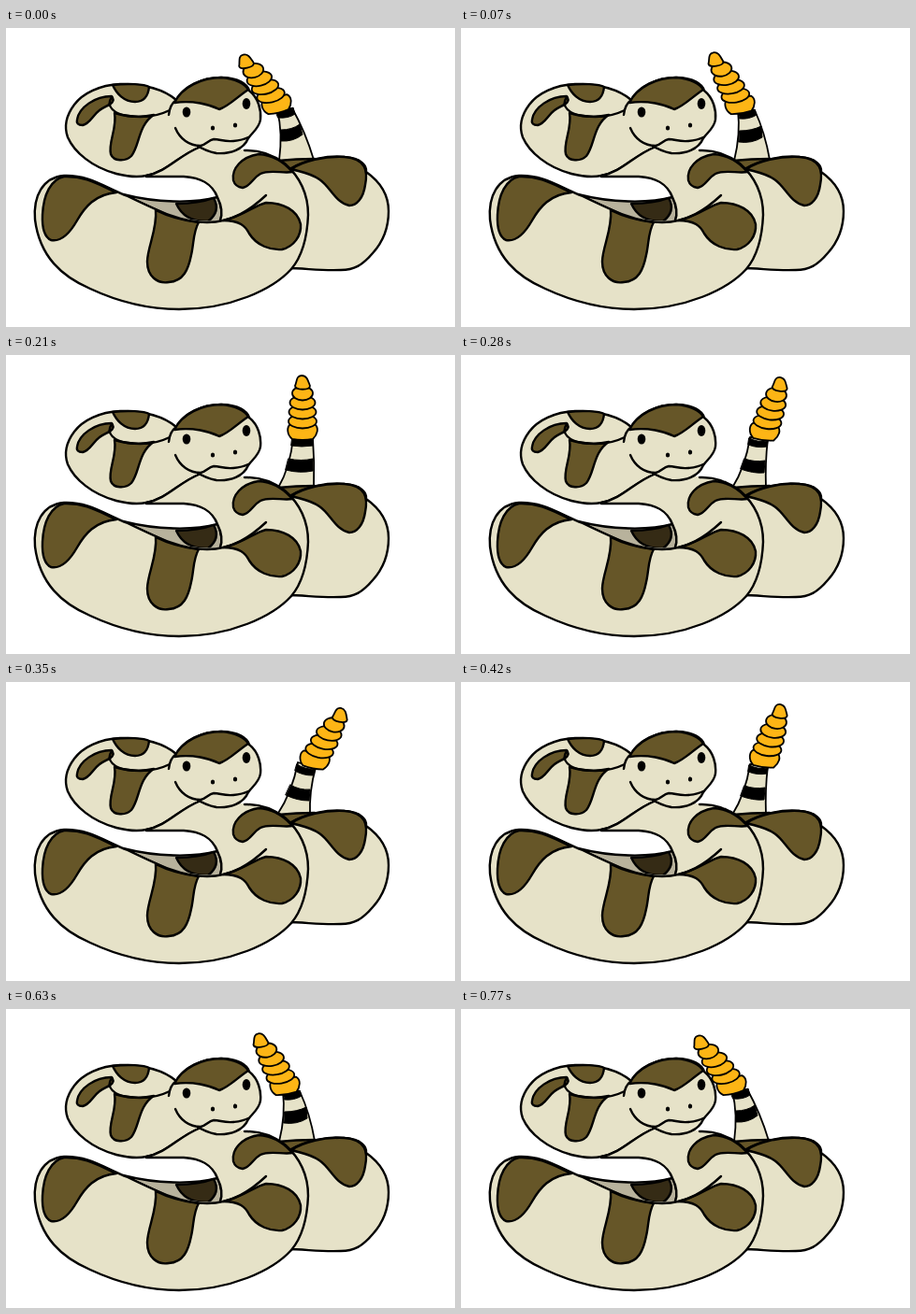
An HTML page without scripts for the animation above (0.84 s loop, 480 by 320 pixels).

```html
<!DOCTYPE html>
<html lang="en">
<head>
<meta charset="utf-8">
<title>Rattlesnake</title>
<style>
  html, body { margin: 0; width: 100%; height: 100%; overflow: hidden; background: #fff; }
  svg { display: block; width: 480px; height: 320px; }
  path, ellipse { stroke: #000; stroke-width: 2.4; stroke-linejoin: round; stroke-linecap: round; }
  .skin { fill: #e6e2c8; }
  .spot { fill: #665628; }
  .line { fill: none; }
  .bare, .dot ellipse { stroke: none; }

  /* The tail swings through six held poses, there and back. */
  .tail { animation: shake .84s step-end infinite; }
  .stalk { d: var(--stalk); stroke-width: 1.8; }
  .bands { d: var(--bands); stroke-width: 1; }
  .rattle { transform: var(--rattle); }
  /* Each ring slides sideways in proportion to its height. */
  .rattle * {
    fill: #fdb515; stroke-width: 1.8;
    transform: translateX(calc(var(--n) * var(--lean)));
  }

  @keyframes shake {
    0%, 91.66%, 100% {
      --stalk: path("M290 88Q296 112 292 142L303 151L329 141Q320 111 306 86Z");
      --bands: path("M289 91Q299 90 307 85L309 92Q302 97 291 96ZM294 109Q306 109 314 103L317 114Q307 122 294 121Z");
      --rattle: translate(294px, 88px) rotate(-13deg);
      --lean: -4.4px;
    }
    8.33%, 75%, 83.33% {
      --stalk: path("M296 88Q299 114 292 142L303 151L330 141Q325 112 314 88Z");
      --bands: path("M296 90Q306 91 314 87L316 93Q308 98 298 97ZM298 110Q311 110 321 105L322 117Q311 124 297 122Z");
      --rattle: translate(302px, 89px) rotate(-9deg);
      --lean: -3.7px;
    }
    16.66%, 66.66% {
      --stalk: path("M304 88Q301 120 291 142L303 151L331 141Q333 115 325 88Z");
      --bands: path("M303 90Q315 92 325 88L327 95Q315 99 303 97ZM301 111Q317 112 330 108L331 121Q316 126 299 123Z");
      --rattle: translate(313px, 90px) rotate(-7deg);
      --lean: -2.2px;
    }
    25%, 58.33% {
      --stalk: path("M307 88Q304 120 291 142L303 151L329 142Q330 115 328 89Z");
      --bands: path("M306 89Q317 93 328 90L328 97Q316 99 305 97ZM302 111Q316 114 328 111L328 124Q314 127 299 123Z");
      --rattle: translate(317px, 89px) rotate(0deg);
      --lean: 0px;
    }
    33.33%, 50% {
      --stalk: path("M309 88Q304 120 290 142L303 151L326 143Q325 115 328 90Z");
      --bands: path("M308 89Q318 94 328 92L327 98Q317 100 307 96ZM303 111Q314 115 325 113L324 126Q312 127 299 122Z");
      --rattle: translate(322px, 89px) rotate(7deg);
      --lean: 2.1px;
    }
    41.66% {
      --stalk: path("M312 86Q306 118 290 142L303 151L325 143Q324 116 331 92Z");
      --bands: path("M311 88Q320 94 330 93L328 100Q317 100 309 95ZM304 110Q314 116 325 115L324 127Q311 127 299 121Z");
      --rattle: translate(326px, 90px) rotate(11deg);
      --lean: 3.6px;
    }
  }
</style>
</head>
<body>
<svg viewBox="0 0 480 320">
  <g class="tail">
    <path class="stalk skin"/>
    <path class="bands"/>
    <g class="rattle">
      <path style="--n:.7" d="M-11 1C-17 -4 -17 -12 -13 -15H13C18 -11 16 -4 11 1Q0 3 -11 1Z"/>
      <ellipse style="--n:1.6" cy="-18" rx="15" ry="7.5"/>
      <ellipse style="--n:2.5" cy="-28" rx="14.5" ry="7.5"/>
      <ellipse style="--n:3.4" cy="-38" rx="13.5" ry="7.5"/>
      <ellipse style="--n:4.4" cy="-48" rx="11" ry="7.5"/>
      <path style="--n:5.7" d="M-8 -56C-6 -60 -7 -67 -1 -67C5 -67 6 -61 8 -56C8 -51 -8 -51 -8 -56Z"/>
    </g>
  </g>
  <path class="spot" d="M291 142L303 152L330 140Q310 140 291 142Z"/>

  <g id="rear-coil">
    <path class="skin" d="M303 151C320 141 345 136 362 138C380 139 386 148 385 154C402 166 409 181 409 196C409 215 402 230 392 241C381 254 372 259 358 259C335 260 320 257 300 257Z"/>
    <path class="spot" d="M305 151C318 142 340 137 362 138C385 140 387 153 384 168C382 182 375 190 367 190C352 187 347 170 335 162C325 155 315 154 305 151Z"/>
  </g>

  <g id="upper-coil">
    <path class="skin" d="M182 77C168 65 147 60 122 60C100 61 82 70 73 82C64 94 62 106 66 117C73 133 92 149 118 156C130 159 141 160 150 158C172 154 184 137 206 128Z"/>
    <path class="spot" d="M114 61C130 59 148 60 153 63C152 73 147 79 138 79C126 79 118 70 114 61Z"/>
    <path class="spot" d="M76 98C78 85 95 73 113 73C119 81 106 83 100 88C92 94 90 102 82 104C77 104 75 102 76 98Z"/>
    <path class="spot" d="M116 91C130 95 145 96 158 93C141 104 143 126 134 137C128 143 115 143 112 135C109 122 119 108 116 91Z"/>
    <path class="line" d="M113 74C106 84 116 92 130 94C150 97 165 93 175 88"/>
  </g>

  <g id="inner-coil">
    <path fill="#b8b29c" d="M125 178C160 187 200 188 226 181Q233 195 229 208H190Z"/>
    <path fill="#352b15" d="M182 188Q206 188 222 182Q230 196 216 207Q191 208 182 188Z"/>
  </g>

  <g id="front-coil">
    <path class="skin bare" d="M62 158C88 157 105 170 130 180C165 197 190 209 229 206Q233 195 226 181C220 166 208 160 190 159H150C172 154 184 137 206 128L247 130Q275 129 298 145C315 160 323 180 323 200C322 225 316 245 305 258C285 280 240 301 185 301C150 301 120 293 90 279C60 266 36 245 31 205C29 180 39 160 62 158Z"/>
    <path class="spot" d="M39 200C40 178 48 162 62 159C85 158 100 168 118 176C95 178 84 192 76 206C68 220 58 229 48 227Q38 222 39 200Z"/>
    <path class="spot" d="M160 195Q180 205 206 208C200 218 201 230 198 243C195 258 190 271 174 272C162 274 151 266 151 250C151 235 162 215 160 195Z"/>
    <path class="spot" d="M232 206C250 206 256 212 260 220C268 233 283 238 295 237C308 234 316 222 315 210C312 195 296 187 278 187C265 190 255 201 232 206Z"/>
    <path class="spot" d="M243 163C241 150 252 138 270 135C285 136 297 143 306 154C296 156 282 151 272 156C263 161 262 169 253 171Q245 170 243 163Z"/>
    <path class="line" d="M305 258C285 280 240 301 185 301C150 301 120 293 90 279C60 266 36 245 31 205C29 180 39 160 62 158C88 157 105 170 130 180C165 197 188 208 215 208C242 208 262 194 278 179"/>
    <path class="line" d="M150 159H190C208 160 220 166 226 181Q233 195 229 206M150 158C172 154 184 137 206 128"/>
    <path class="line" d="M255 131Q278 130 298 145C315 160 323 180 323 200C322 225 316 245 305 258"/>
  </g>

  <g id="head">
    <path class="skin bare" d="M174 93Q175 82 182 77L230 53L260 67L272 98L259 118C254 130 240 135 225 134L203 125C190 120 183 115 181 106Z"/>
    <path class="skin" d="M174 93Q175 82 182 77C190 62 210 53 230 53C248 53 258 60 260 67C270 75 273 88 272 98C271 107 263 112 259 118C254 130 240 135 225 134C215 132 209 129 203 125" stroke-dasharray="none"/>
    <path class="skin bare" d="M172 95L180 92L206 124L203 128Q180 122 172 95Z"/>
    <path class="spot" d="M180 80C188 63 210 53 230 53C245 54 256 60 259 66C248 73 238 84 228 87C218 82 200 77 180 80Z"/>
    <path class="line" d="M181 107C186 119 196 126 208 126C214 125 216 120 222 119C229 119 233 122 243 121Q253 120 259 117"/>
    <g class="dot">
      <ellipse cx="193" cy="90" rx="4.3" ry="5.5"/>
      <ellipse cx="257" cy="81" rx="4.3" ry="6"/>
      <ellipse cx="221" cy="107" rx="2.2" ry="2.6"/>
      <ellipse cx="245" cy="104" rx="2.2" ry="2.6"/>
    </g>
  </g>
</svg>
</body>
</html>
```
